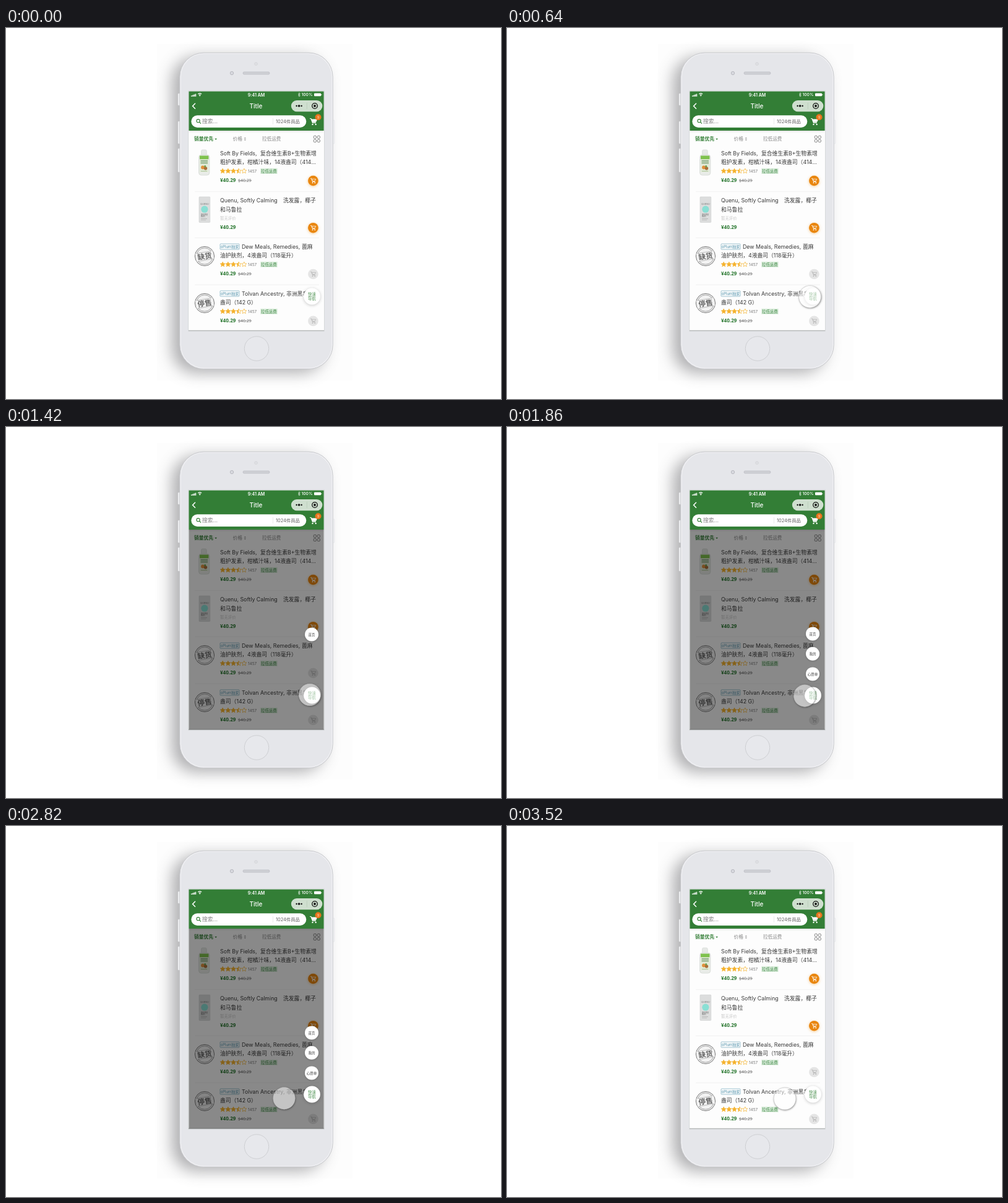
These frames come from a looping animation (800x600 px, 3560 ms). An HTML page with a canvas:

```html
<!DOCTYPE html>
<html lang="zh-CN">
<head>
<meta charset="utf-8">
<title>Quick navigation</title>
<style>
html, body { margin: 0; width: 100%; height: 100%; overflow: hidden; background: #fff; }
canvas { display: block; }
</style>
</head>
<body>
<canvas id="stage" width="800" height="600"></canvas>
<script>
const LOOP = 3560;
const GREEN = '#337e36', ORANGE = '#e9860f', INK = '#3a3a3a';
const SANS = 'Inter, "Noto Sans CJK SC", "Noto Sans CJK", sans-serif';
const PRICE = '"Open Sans", "Noto Sans", sans-serif';
const SCREEN = { left: 295.5, top: 102.6, right: 513.6, bottom: 489.4 };
const stage = document.getElementById('stage').getContext('2d');
const base = document.createElement('canvas');
base.width = 800;
base.height = 600;
let c = base.getContext('2d');

function text(s, x, y, size, color, { weight = 400, align = 'left', family = SANS } = {}) {
  c.font = `${weight} ${size}px ${family}`;
  c.textAlign = align;
  c.textBaseline = 'alphabetic';
  c.fillStyle = color;
  c.fillText(s, x, y + size * 0.36);
}
function paint(fill, stroke, width = 1) {
  if (fill) { c.fillStyle = fill; c.fill(); }
  if (stroke) { c.strokeStyle = stroke; c.lineWidth = width; c.stroke(); }
}
function box(x, y, w, h, r, fill, stroke, width) {
  c.beginPath();
  c.roundRect(x, y, w, h, r);
  paint(fill, stroke, width);
}
function disc(x, y, r, fill, stroke, width) {
  c.beginPath();
  c.arc(x, y, r, 0, Math.PI * 2);
  paint(fill, stroke, width);
}
function line(points, color, width = 1) {
  c.beginPath();
  points.forEach(([x, y]) => c.lineTo(x, y));
  paint(null, color, width);
}
function withShadow(color, blur, dx, dy, draw) {
  c.save();
  c.shadowColor = color;
  c.shadowBlur = blur;
  c.shadowOffsetX = dx;
  c.shadowOffsetY = dy;
  draw();
  c.restore();
}
function fillScreenFrom(top, color) {
  const { left, right, bottom } = SCREEN;
  c.fillStyle = color;
  c.fillRect(left, top, right - left, bottom - top);
}

function cart(x, y, scale, color, filled) {
  c.save();
  c.translate(x, y);
  c.scale(scale, scale);
  line([[-6, -5], [-4, -5], [-1.5, 2], [4, 2]], color, 1.2);
  c.beginPath();
  c.moveTo(-3.4, -3.6);
  c.lineTo(5.6, -3.6);
  c.lineTo(3.6, 0.6);
  c.lineTo(-2, 0.6);
  c.closePath();
  paint(filled ? color : null, color);
  disc(-1.5, 4.4, 1.2, color);
  disc(3.6, 4.4, 1.2, color);
  c.restore();
}

function phone() {
  c.fillStyle = '#fff';
  c.fillRect(0, 0, 800, 600);
  c.fillStyle = '#fdfdfd';
  c.fillRect(244, 26, 316, 544);
  withShadow('rgba(70,70,75,.42)', 25, -13, 7, () => box(281, 40, 247, 511, 39, '#e5e6ea'));
  for (const [x, y, h] of [[278, 106, 19], [278, 151, 36], [278, 195, 38], [527, 149, 38]]) {
    box(x, y, 4, h, 1, '#eff0f2', '#dcdde0', 0.5);
  }
  box(280.8, 40, 247.4, 511.5, 39, '#e5e6ea', '#c6c7ca', 0.9);
  box(282.3, 41.5, 244.4, 508.5, 37.5, null, '#f0f0f3', 1.2);
  disc(404, 58, 2.4, '#dfe0e4', '#d0d1d5', 0.7);
  disc(365, 73, 2.7, '#d8d9df', '#b5b6bd', 0.9);
  box(383, 71, 43, 4, 2, '#cfd0d5', '#b9bac0', 0.7);
  disc(405, 518.5, 19.7, '#e7e8ec', '#cbccd0', 0.9);
  box(294.7, 101.7, 219.8, 388.6, 0, '#fdfdfd', '#d3d6d8', 0.9);
}

function header() {
  withShadow('rgba(0,0,0,.15)', 3, 0, 1, () => {
    c.fillStyle = GREEN;
    c.fillRect(295, 102, 219, 64);
  });
  for (let i = 0; i < 4; i++) {
    c.fillStyle = '#fff';
    c.fillRect(299 + i * 2.2, 109.3 - i * 0.9, 1.6, 1.5 + i * 0.9);
  }
  for (const r of [2.2, 4.4]) {
    c.beginPath();
    c.arc(313.2, 110.2, r, -2.3, -0.84);
    paint(null, '#fff', 1.1);
  }
  disc(313.2, 109.8, 0.8, '#fff');
  text('9:41 AM', 404.5, 108, 7, '#fff', { weight: 600, align: 'center' });
  line([[472, 106.3], [475.4, 109.5], [473.7, 111], [473.7, 104.7], [475.4, 106.3], [472, 109.5]], '#fff', 0.6);
  text('100%', 477.5, 108, 6.7, '#fff', { weight: 500 });
  box(498, 105.6, 11, 4.6, 1, '#fff');
  c.fillStyle = '#fff';
  c.fillRect(509.4, 107, 0.9, 1.8);

  line([[306, 121.7], [301.6, 126.2], [306, 130.7]], '#fff', 1.5);
  text('Title', 404, 126.5, 10, '#fff', { weight: 500, align: 'center' });
  box(460.8, 117, 50.6, 18.2, 9.1, '#cfdfcf');
  [[469.6, 1.2], [473.6, 1.8], [477.6, 1.2]].forEach(([x, r]) => disc(x, 126, r, '#111'));
  line([[486.3, 121], [486.3, 131]], '#b3c8b3', 0.7);
  disc(499, 126, 4.3, null, '#111', 1.3);
  disc(499, 126, 1.9, '#111');

  box(299.3, 141.3, 186, 19.6, 9.8, '#fff');
  disc(310.6, 150.2, 2.6, null, GREEN, 1.1);
  line([[312.5, 152.1], [315, 154.6]], GREEN, 1.2);
  text('搜索...', 317, 151.2, 8.7, '#838383');
  line([[431.5, 146], [431.5, 156]], '#e2e2e2', 0.7);
  text('1024件商品', 436, 151.4, 7.4, '#5c5c5c');
  cart(497, 151.5, 1, '#fff', true);
  disc(504.5, 144.3, 5, '#e9731c');
  text('9', 504.5, 144.4, 6.5, '#ffd3ae', { align: 'center' });
}

function filters() {
  text('销量优先', 304, 179.4, 7.8, GREEN, { weight: 600 });
  c.beginPath();
  c.moveTo(337.2, 178.7);
  c.lineTo(341, 178.7);
  c.lineTo(339.1, 181);
  paint(GREEN);
  text('价格', 366.5, 179.4, 7.8, '#8a8a8a');
  for (const s of [-1, 1]) {
    c.beginPath();
    c.moveTo(384.6, 179.5 + s * 0.8);
    c.lineTo(388, 179.5 + s * 0.8);
    c.lineTo(386.3, 179.5 + s * 2.8);
    paint('#999');
  }
  text('拉低运费', 414, 179.4, 7.6, '#8a8a8a');
  for (const x of [497.2, 503.2]) {
    for (const y of [174.4, 180.4]) box(x, y, 4.2, 4.2, 1.3, null, '#777', 0.9);
  }
}

function star(x, y) {
  c.beginPath();
  for (let i = 0; i < 10; i++) {
    const a = i * Math.PI / 5 - Math.PI / 2, r = i % 2 ? 1.9 : 4.2;
    c.lineTo(x + r * Math.cos(a), y + r * Math.sin(a));
  }
  c.closePath();
}
function rating(y) {
  for (let i = 0; i < 5; i++) {
    const x = 350.2 + i * 8.65;
    star(x, y);
    paint(i < 3 ? '#f5b22c' : null, '#f5b22c', 0.7);
    if (i === 3) {
      c.save();
      c.clip();
      c.fillStyle = '#f5b22c';
      c.fillRect(x - 5, y - 5, 5, 10);
      c.restore();
    }
  }
  text('1457', 391, y, 6.4, '#777');
  box(411, y - 4.6, 27.8, 9.2, 1, '#deefdf');
  text('拉低运费', 412, y, 6.4, '#398440');
}
function price(y, old) {
  text('¥40.29', 346, y, 8.1, '#2d7a34', { weight: 700, family: PRICE });
  if (!old) return;
  text('$40.29', 375, y + 0.4, 6.9, '#777', { family: PRICE });
  line([[375, y + 0.4], [397, y + 0.4]], '#777', 0.7);
}
function buyButton(y, active) {
  withShadow(active ? 'rgba(240,160,50,.55)' : 'transparent', 4, 0, 1,
    () => disc(496.4, y, 8.3, active ? ORANGE : '#e5e5e5'));
  cart(496.6, y, 0.74, active ? '#fff' : '#b5b5b5', false);
}

function bottle() {
  box(315.6, 197, 8.6, 9, 2, '#e6e9e6', '#d3d8d3', 0.7);
  box(311.6, 205, 17.2, 33, 4, '#e9ece8', '#d4d8d3', 0.8);
  box(313, 206.5, 14.4, 6, 1, '#7fc24e');
  box(313, 212.5, 14.4, 20.5, 1, '#e3ecd9');
  for (let y = 214.5; y < 221; y += 2.2) line([[314.5, y], [326, y]], '#5b8b55', 0.9);
  disc(318, 225.5, 2.9, '#e0913c');
  disc(322.5, 227, 2.7, '#a8713a');
  disc(321.7, 223.5, 1.6, '#6aa14b');
  line([[315, 231.6], [325, 231.6]], '#9cb58b', 0.8);
}
function carton() {
  box(312, 273, 17.8, 41.5, 1, '#dcdddd', '#cfd0d0', 0.6);
  text('QUENU', 320.9, 284.3, 3.8, '#777', { align: 'center' });
  disc(320.9, 293.2, 5.6, '#8adfd4');
  text('gently', 315, 302, 3.8, '#666');
  text('soft', 315, 305, 3.8, '#666');
  line([[315, 308.5], [325, 308.5]], '#a5a5a5', 0.7);
  line([[315, 310.7], [323, 310.7]], '#b5b5b5', 0.7);
}
function stamp(y, label) {
  c.save();
  c.translate(321, y);
  disc(0, 0, 15.6, '#f3f3f3', '#777', 1);
  disc(0, 0, 13.3, null, '#8b8b8b', 0.8);
  c.rotate(-0.17);
  box(-14.2, -6.2, 28.4, 12.4, 0, '#f3f3f3');
  line([[-12, -6.4], [12, -6.4]], '#999', 0.6);
  line([[-12, 6.4], [12, 6.4]], '#999', 0.6);
  text(label, 0, 0.3, 11.6, '#666', { weight: 700, align: 'center' });
  c.restore();
}

const products = [
  { y: 202.7, first: [[346, 'Soft By Fields,'], [411, '复合维生素B+生物素增']],
    second: '粗护发素，柑橘汁味，14液盎司（414...', rated: true, active: true },
  { y: 278.9, first: [[346, 'Quenu, Softly Calming'], [448, '洗发露，椰子']],
    second: '和马鲁拉', rated: false, active: true },
  { y: 353.7, first: [[381, 'Dew Meals, Remedies,'], [478, '蓖麻']],
    second: '油护肤剂，4液盎司（118毫升）', rated: true, exclusive: true },
  { y: 429.6, first: [[381, 'Tolvan Ancestry,'], [453, '非洲黑皂，5']],
    second: '盎司（142 G）', rated: true, exclusive: true },
];

function productRow({ y, first, second, rated, active, exclusive }, i) {
  if (i) line([[305, y - 14.3], [506, y - 14.3]], '#f0f0f0', 0.8);
  if (exclusive) {
    box(346, y - 4.6, 31, 9, 1, null, '#75a9bd', 0.7);
    text('oPlum独家', 361.5, y, 6, '#4c8fa9', { align: 'center' });
  }
  first.forEach(([x, s]) => text(s, x, y, 8.8, INK));
  text(second, 346, y + 14.5, 8.8, INK);
  if (rated) rating(y + 28.7);
  else text('暂无评价', 346, y + 28.3, 6.4, '#c6c6c6');
  price(y + 43.6, rated);
  buyButton(y + 44.3, active);
}

function drawBase() {
  phone();
  c.save();
  c.beginPath();
  c.rect(SCREEN.left, SCREEN.top, SCREEN.right - SCREEN.left, SCREEN.bottom - SCREEN.top);
  c.clip();
  header();
  filters();
  products.forEach(productRow);
  bottle();
  carton();
  stamp(369, '缺货');
  stamp(445, '停售');
  c.restore();
  line([[295, 489.3], [514, 489.3]], '#a5a8a9', 1);
}

const clamp = v => Math.min(1, Math.max(0, v));
const progress = (t, start, span) => clamp((t - start) / span);
const smooth = p => p * p * (3 - 2 * p);
const easeOut = p => 1 - (1 - p) ** 3;

const touchPath = [
  [0, 487, 438], [600, 489.5, 434.7], [1140, 491, 432], [1420, 491, 433],
  [1680, 491, 433], [2240, 451, 439.5], [3260, 448.5, 441], [3560, 449, 441],
];
function touchAt(t) {
  const i = touchPath.findIndex(k => k[0] > t);
  const [t0, x0, y0] = touchPath[i - 1], [t1, x1, y1] = touchPath[i];
  const p = smooth((t - t0) / (t1 - t0));
  return [x0 + (x1 - x0) * p, y0 + (y1 - y0) * p];
}

function fab() {
  withShadow('rgba(0,0,0,.22)', 5, 0, 1, () => disc(494.5, 434, 13.4, '#fff'));
  text('快速', 494.5, 430.7, 6.4, '#4c9150', { align: 'center' });
  text('导航', 494.5, 437.6, 6.4, '#4c9150', { align: 'center' });
}

const menu = [['首页', 334.4], ['我的', 366.7], ['心愿单', 399.4]];
function menuItem([label, y], i, t, closing) {
  const shown = easeOut(progress(t, 1310 + i * 130, 190));
  c.save();
  c.globalAlpha = clamp(shown * 1.3) * (1 - closing);
  const top = y + 16 * (1 - shown);
  withShadow('rgba(0,0,0,.2)', 3, 0, 1, () => disc(494, top, 11, '#fff'));
  text(label, 494, top + 0.2, 5.5, '#444', { align: 'center' });
  c.restore();
}

function touch(t) {
  const [x, y] = touchAt(t);
  c.save();
  c.globalAlpha = smooth(progress(t, 260, 320));
  // Cast the shadow only outside the translucent disc.
  c.save();
  c.beginPath();
  c.rect(x - 30, y - 30, 60, 60);
  c.arc(x, y, 17.8, 0, Math.PI * 2);
  c.clip('evenodd');
  withShadow('rgba(0,0,0,.5)', 3, 0.4, 0.9, () => disc(x, y, 17.8, '#bbb'));
  c.restore();
  disc(x, y, 17.8, 'rgba(255,255,255,.5)', 'rgba(170,170,170,.4)', 0.6);
  c.restore();
}

function render(t) {
  c.drawImage(base, 0, 0);
  const closing = smooth(progress(t, 3290, 180));
  const dim = 0.46 * smooth(progress(t, 1190, 230)) * (1 - closing);
  fillScreenFrom(166, `rgba(0,0,0,${dim})`);
  menu.forEach((item, i) => menuItem(item, i, t, closing));
  fab();
  touch(t);
}

drawBase();
c = stage;
const began = performance.now();
function tick() {
  render((performance.now() - began) % LOOP);
  requestAnimationFrame(tick);
}
tick();
</script>
</body>
</html>
```
